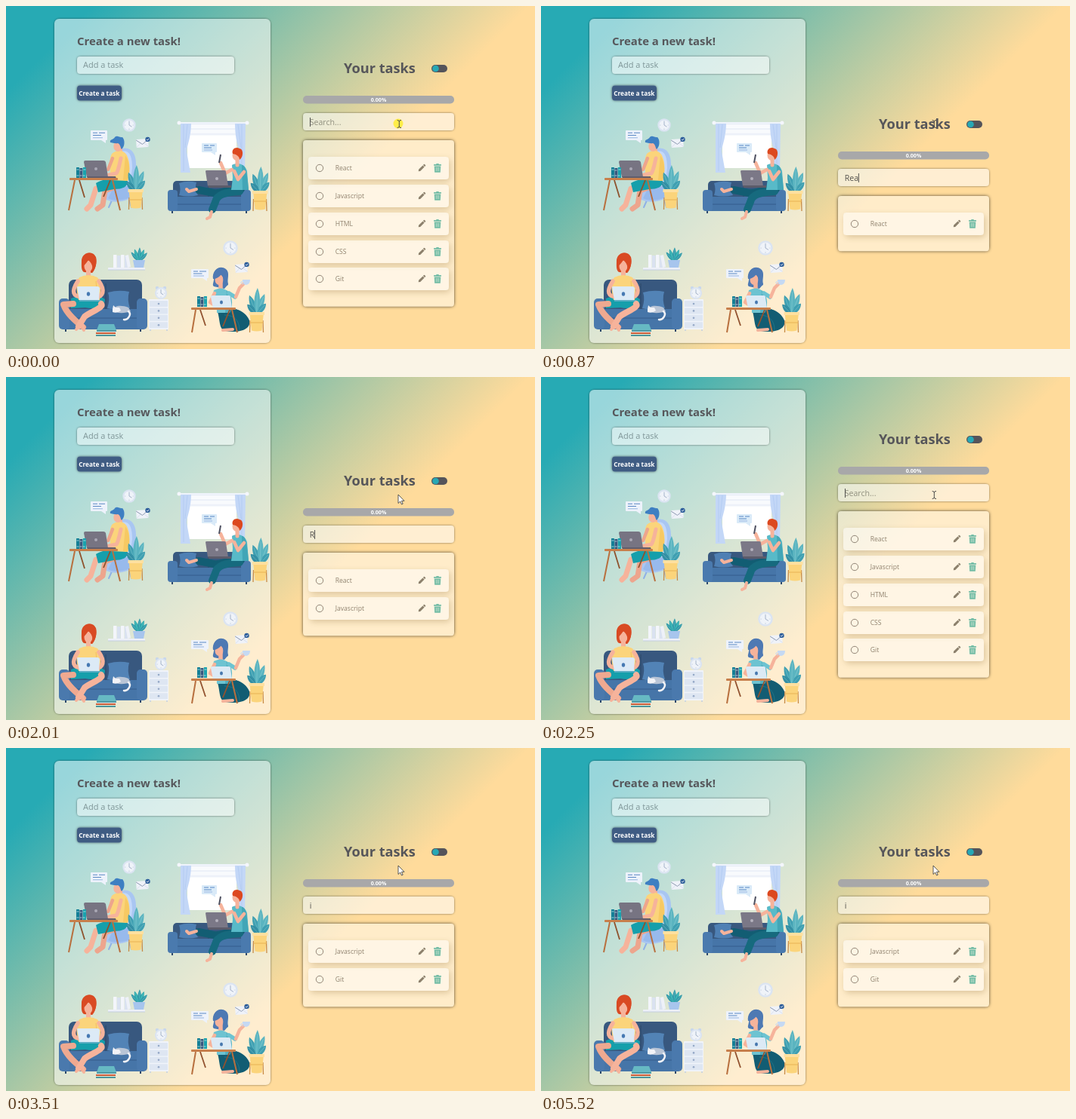
Animation of 700 by 455 pixels, one loop 5.64 s. Source, as an HTML page with a canvas:

```html
<!DOCTYPE html>
<html lang="en">
<head>
<meta charset="utf-8">
<title>Task list search</title>
<style>
html, body { margin: 0; width: 100%; height: 100%; overflow: hidden; background: #ffdb9b; }
canvas { display: block; width: 700px; height: 455px; }
</style>
</head>
<body>
<canvas id="stage"></canvas>
<script>
const W = 700, H = 455, LOOP = 5640;
const stage = document.getElementById('stage');
const dpr = window.devicePixelRatio || 1;
stage.width = W * dpr;
stage.height = H * dpr;
const ctx = stage.getContext('2d');
ctx.scale(dpr, dpr);

const SKIN = '#f6b39b', NAVY = '#38587f', BLUE = '#4675a8', TEAL = '#159fab',
  DEEP = '#125d73', WOOD = '#b8703f', YELLOW = '#fbd47b', SKY = '#c3d7f7';
const TASKS = ['React', 'Javascript', 'HTML', 'CSS', 'Git'];

// start time, search text, caret shown
const STEPS = [
  [0, '', 1], [130, '', 1], [370, 'R', 0], [750, 'Re', 1], [870, 'Rea', 1],
  [1000, 'Reac', 1], [1120, 'React', 1], [1380, 'React', 0], [1620, 'Reac', 1],
  [1750, 'Re', 1], [2010, 'R', 1], [2130, '', 1], [2510, '', 0], [2760, 'i', 1],
  [3510, 'i', 0], [4010, 'i', 1], [4520, 'i', 0], [5010, 'i', 1], [5520, 'i', 0]
];

function fill(color, d) {
  ctx.fillStyle = color;
  ctx.fill(new Path2D(d));
}
function line(color, width, d) {
  ctx.strokeStyle = color;
  ctx.lineWidth = width;
  ctx.stroke(new Path2D(d));
}
function limb(width, d, color = SKIN) {
  ctx.save();
  ctx.lineCap = ctx.lineJoin = 'round';
  line(color, width, d);
  ctx.restore();
}
function dot(color, x, y, r, ry = r) {
  ctx.fillStyle = color;
  ctx.beginPath();
  ctx.ellipse(x, y, r, ry, 0, 0, 7);
  ctx.fill();
}
function box(color, x, y, w, h, r = 0) {
  ctx.fillStyle = color;
  ctx.beginPath();
  ctx.roundRect(x, y, w, h, r);
  ctx.fill();
}
function text(str, x, y, size, color, weight = 400, align = 'left') {
  ctx.font = `${weight} ${size}px "Open Sans", "Noto Sans", sans-serif`;
  ctx.textAlign = align;
  ctx.textBaseline = 'alphabetic';
  ctx.fillStyle = color;
  ctx.fillText(str, x, y);
}

// Translucent box whose shadow falls only outside it
function glass(x, y, w, h, r, color, shadow, blur, dx = 0, dy = 0) {
  ctx.save();
  const outside = new Path2D();
  outside.rect(0, 0, W, H);
  outside.roundRect(x, y, w, h, r);
  ctx.clip(outside, 'evenodd');
  ctx.shadowColor = shadow;
  ctx.shadowBlur = blur * dpr;
  ctx.shadowOffsetX = dx * dpr;
  ctx.shadowOffsetY = dy * dpr;
  box('#000', x + 0.5, y + 0.5, w - 1, h - 1, r);
  ctx.restore();
  box(color, x, y, w, h, r);
}

function clock(x, y, r) {
  dot('#dbe4f2', x, y, r);
  dot('#eff3f9', x, y, r * 0.76);
  line('#94a3bd', 0.8, `M${x} ${y - r * 0.55}V${y}L${x + r * 0.4} ${y + r * 0.25}`);
  for (let i = 0; i < 4; i++) {
    const a = i * Math.PI / 2;
    dot('#b5c2d6', x + Math.cos(a) * r * 0.6, y + Math.sin(a) * r * 0.6, 0.6);
  }
}
function bubble(x, y, w, h, color = '#edf2fb') {
  box(color, x, y, w, h, 1);
  fill(color, `M${x + w - 8} ${y + h}h6v4z`);
  const row = h / 4;
  line('#5b88c4', 1.2, `M${x + 3} ${y + row}h6m2 0h${w - 14}M${x + 3} ${y + 2 * row}h${w * 0.5}`);
  line('#a5c0e6', 1.2, `M${x + 3} ${y + 3 * row}h${w - 9}`);
}
function envelope(x, y) {
  ctx.save();
  ctx.translate(x, y);
  ctx.rotate(-0.07);
  box('#eff2f9', 0, 0, 16, 11, 1);
  line('#8592aa', 0.9, 'M0 1L8 7L16 1');
  line('#cbd5e6', 0.6, 'M0 10.5L6 5.5M16 10.5L10 5.5');
  dot('#2f5f9b', 15.5, 1, 3.2);
  line('#fff', 0.8, 'M14 1l1.2 1.2 2-2.2');
  ctx.restore();
}
function leaf(x, y, angle, len, wide, color) {
  ctx.save();
  ctx.translate(x, y);
  ctx.rotate(angle);
  fill(color, `M0 0C${-wide} ${-len * 0.3} ${-wide} ${-len * 0.7} 0 ${-len}C${wide} ${-len * 0.7} ${wide} ${-len * 0.3} 0 0Z`);
  line('rgba(190,235,235,.5)', 0.5, `M0 0V${-len * 0.85}`);
  ctx.restore();
}
function plant(x, y) {
  const greens = ['#3f9fb1', '#5bb4c0', '#338fa4'];
  [[-0.36, 27], [0.38, 29], [-0.75, 18], [0.72, 19], [0.04, 35]].forEach(([a, len], i) =>
    leaf(x, y + 2, a, len, 5, greens[i % 3]));
  ctx.save();
  ctx.translate(x, y);
  line('#c78b45', 1.3, 'M-8.5 10L-9 26M8.5 10L9 26');
  fill(YELLOW, 'M-9 0H9.5L7 23.5Q0 25.5 -6.5 23.5Z');
  fill('#ffe0a0', 'M-10 -1H10.5V3H-10Z');
  line('#e8b254', 1, 'M-8.5 13H9');
  ctx.restore();
}
function books(x, y) {
  box('#147f96', x, y, 4, 14, 0.6);
  box(NAVY, x + 4.4, y + 1, 4, 13, 0.6);
  box('#1aa2ae', x + 8.8, y, 4.2, 14, 0.6);
  line('#bfe4ea', 0.8, `M${x + 0.5} ${y + 3}h3m1 1h3m2-1h3m-12 8h3m1 0h3m1 0h3`);
}

function manAtDesk() {
  clock(163, 158, 8.7);
  bubble(112, 165, 22, 13);
  envelope(172, 177);
  limb(2, 'M140 258L136 267M163 258L166 267', '#8fb2e6');
  fill('#a9c6f2', 'M153 189C165 186 172 195 172 209C172 225 177 238 170 250C162 261 140 262 131 256C127 250 132 240 142 236Z');
  fill('#c3d8f9', 'M153 193C164 190 167 201 167 215L164 238L145 243Z');
  fill('#98baec', 'M140 245C150 238 172 236 173 245C170 256 145 261 135 255Z');
  limb(7, 'M147 239L131 245L128 264L121 269', '#eda58d');
  limb(7, 'M140 236L119 242L112 264L107 269');
  fill(TEAL, 'M119 235C130 228 148 227 161 231C162 240 154 243 143 243L122 247Z');
  limb(6, 'M151 188V196');
  fill(YELLOW, 'M140 196C146 191 155 190 160 198C165 208 164 221 161 232L138 231C139 217 135 205 140 196Z');
  fill('#f6c963', 'M158 198C165 209 164 222 161 232L155 231Z');
  dot(SKIN, 148, 186, 5.7, 7);
  fill('#3e7fc2', 'M138 181C137 176 142 178 144 174C148 171 150 175 154 174C158 178 157 187 153 190C151 188 152 184 148 182C144 183 141 181 138 181Z');
  limb(4.5, 'M141 202L135 217', '#eda58d');
  limb(5, 'M152 202C150 210 149 218 146 222L131 225');
  fill('#777482', 'M103 207Q103 205 105 205L129 205Q131 205 132 207L135 227H107Z');
  fill('#605e6d', 'M107 226H145L146 229H108Z');
  dot('#aaa8b5', 119, 216, 2);
  books(93, 214);
  line('#8e522d', 1.8, 'M97 231L104 254M138 231L129 253');
  line(WOOD, 2, 'M91 231L83 271M141 231L151 271');
  box('#c77f4c', 84, 228, 64, 3, 1);
  plant(171.5, 244);
}

function manOnSofa() {
  box('#fff', 240, 155, 65, 60);
  for (let i = 0; i < 5; i++) box(i % 2 ? '#f8fafd' : '#edf1f9', 244, 155 + i * 3.4, 60, 2.8);
  fill(SKY, 'M231 154H245C245 175 240 183 239 193L244 221H231Z');
  fill(SKY, 'M303 154H317L316 221H305L309 193C305 181 303 171 303 154Z');
  line('#a9c4ee', 0.6, 'M235 157V219M240 157L237 188M312 157V219M307 157L311 188');
  line('#eef3fb', 2.2, 'M229 155H320');
  dot('#f4f6fc', 229, 155, 2.5);
  dot('#f4f6fc', 319, 155, 2.5);
  bubble(259, 182, 20, 12, '#d9eaf8');
  box(NAVY, 221, 232, 97, 30, 5);
  line('#2d496c', 1, 'M268 236V254');
  fill('#4f80b4', 'M229 235Q240 231 252 234Q249 242 254 251Q241 254 229 251Q232 243 229 235Z');
  box(BLUE, 218, 253, 102, 19, 3);
  line('#345d8c', 1, 'M226 263H312');
  box('#4a7aae', 214, 244, 13, 28, 4);
  box('#4a7aae', 311, 244, 13, 28, 4);
  line('#2d496c', 2, 'M220 272V275M318 272V275');
  limb(10, 'M311 243C298 240 286 250 275 248L255 244', DEEP);
  limb(10, 'M309 246C290 247 279 250 277 260L273 270', '#166a7e');
  limb(4, 'M252 243L242 246L239 243M272 273L270 280L266 282');
  fill('#58bac8', 'M299 211C308 206 317 211 319 219L321 244H298L300 228Z');
  fill('#42a6b7', 'M312 211C317 211 319 220 321 244H313Z');
  limb(5, 'M306 204V211');
  dot(SKIN, 305, 198, 5.5, 7);
  fill('#dc481f', 'M300 196C298 190 304 186 309 189C315 190 314 201 309 204C309 200 306 197 300 196Z');
  limb(4.5, 'M299 217L290 222L284 208M315 220L307 230L302 219');
  line('#4f5161', 2, 'M284 197L282 208');
  fill('#7b7887', 'M264 219Q264 218 266 218H289Q291 218 291 220L294 239H267Z');
  fill('#5c5b6a', 'M267 238H298V241H268Z');
  dot('#b4b2bd', 279, 229, 2);
  plant(336, 246);
}

function womanOnSofa() {
  box('#edf0f8', 135, 347, 49, 3, 0.5);
  line('#c4cedf', 1, 'M135 350H184');
  for (let i = 0; i < 4; i++) {
    box(i % 2 ? '#dae2f0' : '#f3f5fb', 142 + i * 5, 330 + i % 2, 4.5, 17 - i % 2, 0.6);
  }
  fill('#eef1f8', 'M158 331L162 330L165 346L161 347Z');
  [-0.7, -0.35, 0.05, 0.4, 0.75].forEach((a, i) => leaf(176, 339, a, 19 - Math.abs(a) * 4, 3, i % 2 ? '#2ba9ad' : '#319aa9'));
  fill('#a7c5ed', 'M168 337H184L182 347H170Z');
  box(NAVY, 83, 363, 97, 52, 7);
  line('#2b4769', 1, 'M132 368V402');
  box(BLUE, 75, 402, 107, 27, 3);
  line('#345d8b', 1, 'M84 414H174');
  box('#4a79ad', 70, 388, 14, 41, 5);
  box('#4a79ad', 173, 388, 14, 41, 5);
  line('#29466a', 2, 'M79 429V432M178 429V432');
  fill('#5283b6', 'M135 380Q149 376 163 379Q160 389 164 401Q149 405 134 401Q138 389 135 380Z');
  fill('#b9c5d6', 'M141 404C143 396 154 397 162 400L165 405C157 408 146 408 141 404Z');
  fill('#f2f3f7', 'M141 402L142 397L145 400L150 400L152 404Q147 408 141 406Z');
  limb(2.5, 'M162 405C167 409 161 417 156 416', '#f2f3f7');
  fill(TEAL, 'M86 388C101 381 122 382 131 389C131 400 118 403 105 400L86 401Z');
  limb(8, 'M89 395L76 396C80 408 92 418 102 426', '#efa990');
  limb(8, 'M126 395C130 400 113 405 104 412L96 425');
  limb(4, 'M102 424L103 430M96 424L93 429');
  fill('#d94a23', 'M100 337C101 328 111 324 117 330C121 336 120 347 114 354L103 353C99 350 100 344 100 337Z');
  limb(6, 'M109 350V359');
  fill(YELLOW, 'M97 360Q109 354 121 360C127 367 125 382 124 390H96C94 381 91 368 97 360Z');
  line('#f5bf63', 1, 'M119 365L121 386');
  limb(5.5, 'M95 365C86 379 88 386 102 386M123 365C132 378 128 386 119 386');
  dot(SKIN, 109, 345, 5.5, 7.5);
  fill('#d94a23', 'M102 345C98 329 112 323 119 333C121 340 118 350 114 354C116 345 113 341 109 337Q105 343 102 345Z');
  fill('#dceaf6', 'M94 373Q94 372 96 372H121Q123 372 124 374L123 390H97Z');
  line('#9fbdda', 1, 'M97 391H126');
  dot('#4679b2', 109, 382, 2.2, 2.7);
  box('#f1f4fa', 189, 389, 26, 40, 1);
  for (let i = 0; i < 4; i++) {
    box('#dee6f2', 190, 391 + i * 9.4, 24, 8, 0.7);
    dot('#95a9c7', 202, 395 + i * 9.4, 1.3);
  }
  line('#c1cfe2', 1.5, 'M191 429V431M213 429V431');
  dot('#c8d7ec', 200, 374, 2.2);
  dot('#c8d7ec', 210, 374, 2.2);
  clock(205, 381, 8);
  fill('#66b9c3', 'M123 422L143 422L146 430L120 430Z');
  fill('#f4f0ec', 'M120 430H146V433H120Z');
  fill('#c95c38', 'M119 433H145V435H119Z');
  line('#197b8b', 1.5, 'M120 431H146M119 437H145');
}

function womanAtTable() {
  clock(297, 321, 9.8);
  bubble(245, 349, 23, 12);
  envelope(303, 343);
  fill(DEEP, 'M279 402C294 396 317 403 322 417C325 430 307 434 290 431C281 428 284 417 279 402Z');
  line('#1d7488', 1, 'M289 410C301 410 309 416 309 430');
  limb(4, 'M300 429L287 430');
  fill('#4e79b3', 'M275 360C273 350 283 343 291 349C297 354 292 362 294 369L289 375L275 372C272 370 276 365 275 360Z');
  limb(5.5, 'M284 367V378');
  fill('#6dc3d1', 'M275 377Q286 371 294 379C301 387 300 399 296 407H279C280 398 272 386 275 377Z');
  fill('#52afbf', 'M292 377C300 385 300 399 296 407H290Z');
  dot(SKIN, 282, 363, 5.5, 7);
  fill('#4e79b3', 'M274 362C272 350 284 343 291 350C296 356 291 362 294 370Q289 373 287 369Q289 361 285 356Q280 362 274 362Z');
  limb(5.5, 'M295 381L303 386', '#6dc3d1');
  limb(4.5, 'M304 386L309 374L314 369');
  fill('#c5d9f3', 'M313 363H323Q323 370 317 370Q313 369 313 363Z');
  line('#c5d9f3', 1, 'M313 365Q308 367 314 369');
  limb(4.5, 'M276 381L270 393L280 399');
  fill('#dceaf5', 'M271 386Q271 384 273 384H295Q297 384 297 386L299 401H274Z');
  line('#b0c7df', 1.5, 'M275 402H304');
  dot('#4778af', 285, 393, 2, 2.5);
  books(253, 385);
  line('#92522f', 1.8, 'M257 403L264 424M296 403L287 425');
  line(WOOD, 2, 'M251 403L246 433M299 403L306 433');
  box('#c77f4c', 245, 400, 59, 3, 1);
  plant(331.5, 407);
}

function background() {
  // 135 degree blend: stops lie on lines of equal x + y
  const end = 0.6 * (W + H) / 2;
  const grad = ctx.createLinearGradient(0, 0, end, end);
  grad.addColorStop(0.165, '#27aab4');
  grad.addColorStop(1, '#ffdb9b');
  ctx.fillStyle = grad;
  ctx.fillRect(0, 0, W, H);
}

function createPanel() {
  glass(64, 17, 286, 430, 6, 'rgba(255,255,255,.52)', 'rgba(0,0,0,.75)', 3);
  text('Create a new task!', 94, 52, 14.9, '#56575b', 700);
  glass(94, 67, 208, 23, 4, 'rgba(255,255,255,.5)', 'rgba(0,0,0,.75)', 3);
  text('Add a task', 102, 82, 11, '#7f9698');
  glass(94, 105.5, 59, 20, 4, '#3f5c83', 'rgba(0,0,0,.85)', 3.5);
  text('Create a task', 123.3, 119, 8.25, '#fff', 700, 'center');
  manAtDesk();
  manOnSofa();
  womanOnSofa();
  womanAtTable();
}

function pencil(x, y) {
  ctx.save();
  ctx.translate(x, y);
  ctx.rotate(Math.PI / 4);
  fill('#8c806c', 'M-1.5 -3.6H1.5V4L0 6L-1.5 4ZM-1.5 -4.3V-5.5Q-1.5 -6.3 -.8 -6.3H.8Q1.5 -6.3 1.5 -5.5V-4.3Z');
  ctx.restore();
}
function trash(x, y) {
  box('#72bca5', x - 5, y - 5, 10, 1.7, 0.4);
  box('#72bca5', x - 1.8, y - 6, 3.6, 1.3, 0.4);
  fill('#72bca5', `M${x - 4.3} ${y - 2.6}H${x + 4.3}L${x + 3.8} ${y + 5.7}H${x - 3.8}Z`);
  line('#cfe5d3', 0.7, `M${x - 1.8} ${y - 1}v5M${x} ${y - 1}v5M${x + 1.8} ${y - 1}v5`);
}
function taskRow(name, top) {
  const mid = top + 15;
  glass(400, top, 186, 30, 4, 'rgba(255,255,255,.5)', 'rgba(130,95,40,.3)', 9, 2, 3);
  ctx.strokeStyle = '#85796a';
  ctx.lineWidth = 0.9;
  ctx.beginPath();
  ctx.arc(415, mid, 4.7, 0, 7);
  ctx.stroke();
  text(name, 435.7, mid + 3, 8.6, '#8f826e');
  pencil(550, mid);
  trash(571, mid);
}

function taskPanel(query, caret) {
  const found = TASKS.filter(name => name.toLowerCase().includes(query.toLowerCase()));
  const gap = 36.85, shift = Math.round((TASKS.length - found.length) * gap / 2);
  ctx.save();
  ctx.translate(0, shift);
  text('Your tasks', 447, 89, 18.2, '#56565a', 700);
  box('#55545a', 563, 78, 21, 10, 5);
  dot('#27a8b5', 568.5, 83, 4.3);
  box('#a8a8a9', 393, 119, 200, 10.5, 5);
  text('0.00%', 493, 126.5, 7.1, '#fff', 700, 'center');
  glass(393, 142, 200, 23, 4, 'rgba(255,255,255,.55)', 'rgba(0,0,0,.75)', 3);
  text(query || 'Search...', 401.7, 158, 10.6, query ? '#55544f' : '#91907f');
  if (caret) {
    const x = 402.5 + (query ? ctx.measureText(query).width - 0.5 : 0);
    line('#444', 0.9, `M${x} 148V160`);
  }
  glass(393, 178, 200, 36.5 + found.length * gap, 4, 'rgba(255,255,255,.46)', 'rgba(0,0,0,.85)', 4.5);
  found.forEach((name, i) => taskRow(name, Math.round(200 + i * gap)));
  ctx.restore();
  return found.length;
}

function pointer(isText, clicked) {
  if (clicked) dot('rgba(255,236,48,.85)', 519, 156, 6.5);
  if (isText) {
    line('#484848', 1, 'M517.7 151.5Q520 151.5 520.3 153Q520.6 151.5 523 151.5M520.3 152.5V160.5M517.7 161.5Q520 161.5 520.3 160Q520.6 161.5 523 161.5');
  } else {
    const d = 'M519 156V167.5L521.7 165L523.5 169L525.2 168.2L523.5 164.3H527Z';
    fill('#fff', d);
    line('#333', 0.8, d);
  }
}

let shown = -1;
function draw(now) {
  const t = now % LOOP;
  const at = STEPS.findLastIndex(step => step[0] <= t);
  if (at !== shown) {
    shown = at;
    background();
    createPanel();
    const count = taskPanel(STEPS[at][1], STEPS[at][2]);
    pointer(count !== 2, at === 0);
  }
  requestAnimationFrame(() => draw(performance.now() - start));
}
const start = performance.now();
draw(0);
</script>
</body>
</html>
```
